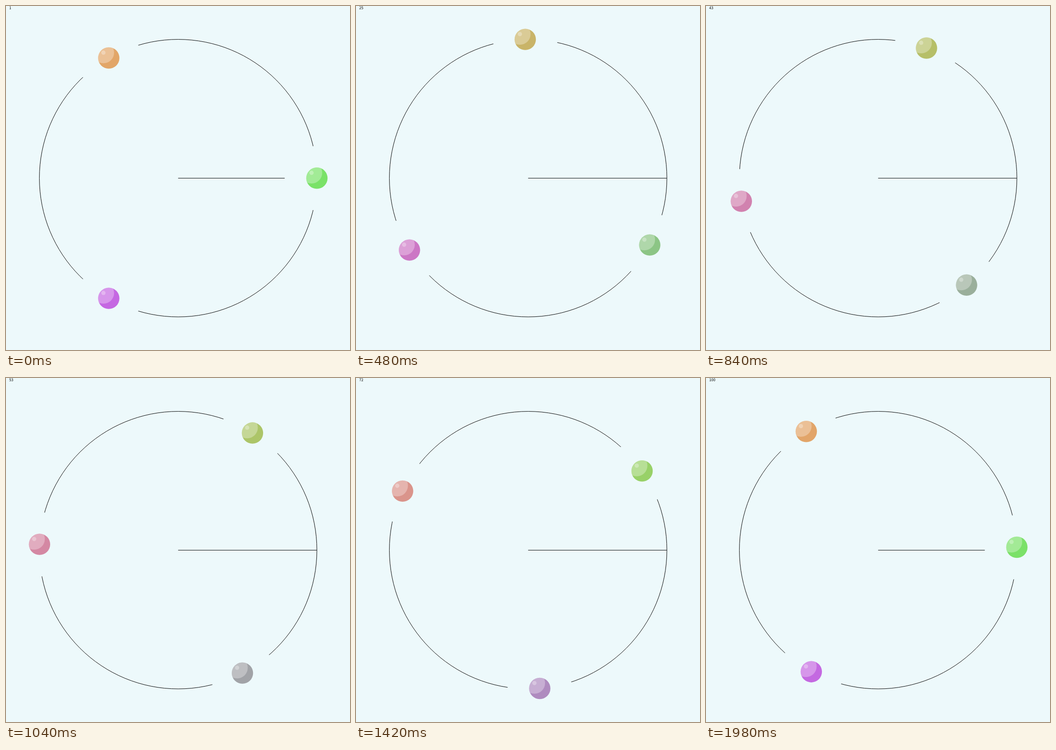
An HTML page for the animation above (2 s loop, 748 by 748 pixels).

```html
<!DOCTYPE html>
<html lang="en">
<head>
<meta charset="utf-8">
<title>Orbiting balls</title>
<style>
  html, body { margin: 0; width: 100%; height: 100%; overflow: hidden; background: #edf9fb; }
  svg { display: block; width: 100vw; height: 100vh; }
  text { font: 8px "Noto Sans CJK JP", "Noto Sans CJK SC", "Noto Sans CJK", "Noto Sans", sans-serif; }
</style>
</head>
<body>
<svg viewBox="0 0 748 748">
  <defs>
    <clipPath id="ballClip"><circle r="23.2"/></clipPath>
    <g id="shine" fill="#fff" fill-opacity=".3">
      <circle cx="-11.6" cy="-11.6" r="23.2" clip-path="url(#ballClip)"/>
      <circle cx="-11.6" cy="-11.6" r="4.64"/>
    </g>
  </defs>
  <rect width="748" height="748" fill="#edf9fb"/>
  <g fill="none" stroke="#000">
    <circle cx="374.3" cy="374.3" r="301.7"/>
    <path d="M374.3 374.4H676"/>
  </g>
  <g id="balls"></g>
  <text id="counter" x="7" y="7.4"></text>
</svg>
<script>
const LOOP = 2000, STEPS = 100, CENTER = 374.3, ORBIT = 301.7;
// Each ball turns into the color of the next one as it takes its place.
const colors = [[122, 226, 104], [197, 104, 226], [226, 166, 104]];
const counter = document.getElementById("counter");
const layer = document.getElementById("balls");

const balls = colors.map(() => {
  const ball = document.createElementNS("http://www.w3.org/2000/svg", "g");
  ball.innerHTML = '<circle r="70" fill="#edf9fb"/><circle r="23.2"/><use href="#shine"/>';
  return layer.appendChild(ball);
});

function mix(from, to, t) {
  return `rgb(${from.map((c, i) => Math.round(c + (to[i] - c) * t))})`;
}

function draw(ms) {
  const step = Math.floor((ms % LOOP) / LOOP * STEPS + 1e-6);
  const t = step / STEPS;
  balls.forEach((ball, i) => {
    const angle = (i + t) * 2 * Math.PI / balls.length;
    const x = CENTER + ORBIT * Math.cos(angle);
    const y = CENTER + ORBIT * Math.sin(angle);
    ball.setAttribute("transform", `translate(${x} ${y})`);
    ball.children[1].setAttribute("fill", mix(colors[i], colors[(i + 1) % colors.length], t));
  });
  counter.textContent = step + 1;
}

let start;
function tick(now) {
  start ??= now;
  draw(now - start);
  requestAnimationFrame(tick);
}
draw(0);
requestAnimationFrame(tick);
</script>
</body>
</html>
```
